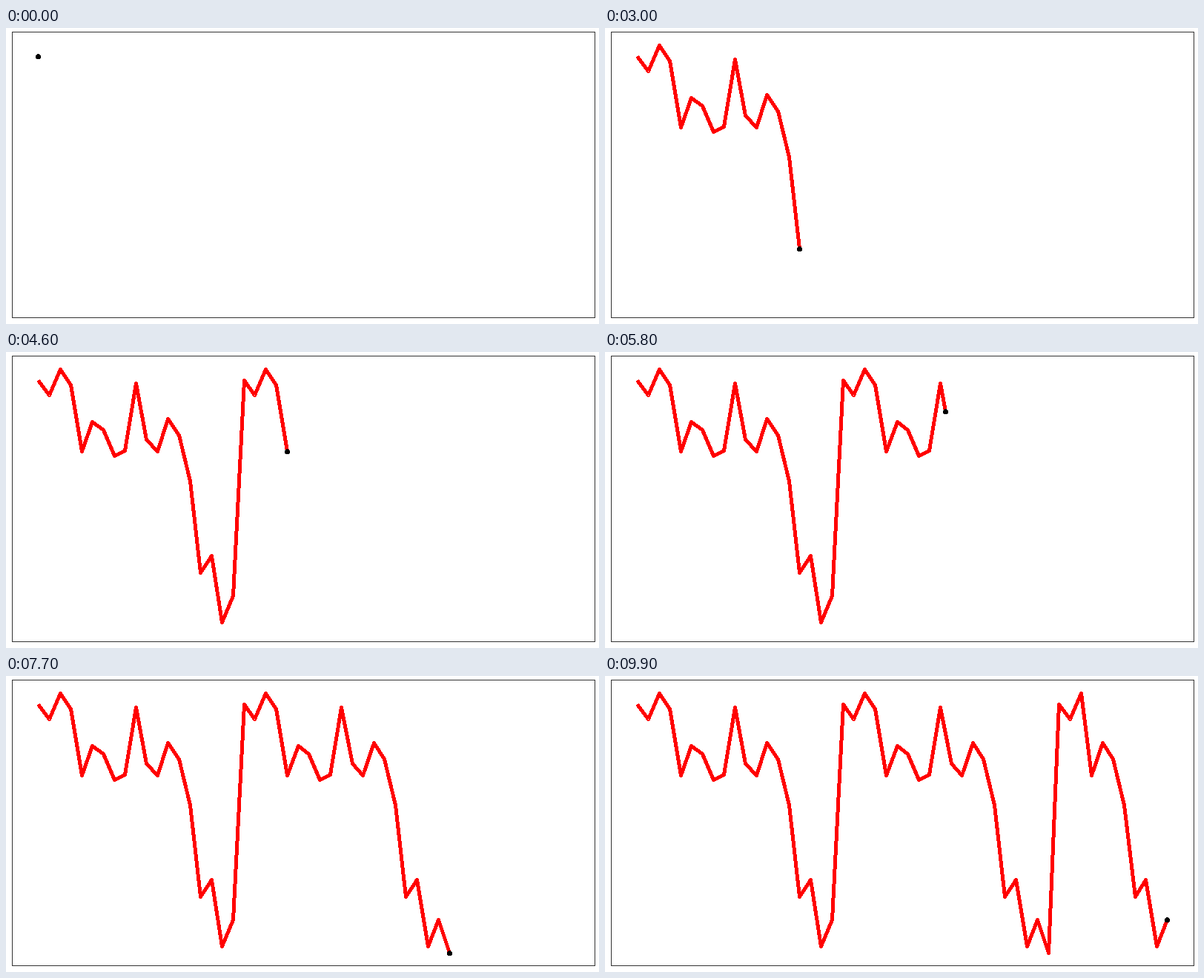
Animation, 800 px wide and 400 px high, one loop 10000 ms. Source, as an HTML page:

```html
<!DOCTYPE html>
<html lang="en">
<head>
<meta charset="utf-8">
<title>Line reveal</title>
<style>
  html, body { margin: 0; width: 100%; height: 100%; overflow: hidden; background: #fff; }
  svg { display: block; }
</style>
</head>
<body>
<svg width="800" height="400" shape-rendering="crispEdges">
  <rect x="8.5" y="5.5" width="786" height="386" fill="none" stroke="#333"/>
  <g transform="translate(.5 .5)">
    <polyline id="line" fill="none" stroke="#f00" stroke-width="5" stroke-linejoin="round"/>
    <circle id="dot" r="3.5"/>
  </g>
</svg>
<script>
const line = document.getElementById('line');
const dot = document.getElementById('dot');

// The series repeats: a full run, a run with a dip at the end, a shortened run.
const start = [38, 58, 23], middle = [44, 134, 94, 105, 140, 133, 42, 118];
const end = [134, 90, 112, 174, 298, 275, 365, 329];
const run = [...start, ...middle, ...end];
const ys = [...run, ...run, 374, ...start, ...end];

const STEPS = 100, STEP_MS = 100;
const last = ys.length - 1;
const stepOf = i => Math.round(i * (STEPS - 1) / last);
const xAt = i => Math.round(43.4 + 14.59 * i);

function draw(now) {
  const step = Math.floor(now / STEP_MS) % STEPS;
  let i = 0;
  while (i < last && stepOf(i + 1) <= step) i++;

  const points = ys.slice(0, i + 1).map((y, k) => [xAt(k), y]);
  if (i < last && step > stepOf(i)) {
    const part = (step - stepOf(i)) / (stepOf(i + 1) - stepOf(i));
    points.push([xAt(i + part), Math.round(ys[i] + part * (ys[i + 1] - ys[i]))]);
  }

  const [x, y] = points[points.length - 1];
  line.setAttribute('points', points.join(' '));
  dot.setAttribute('cx', x);
  dot.setAttribute('cy', y);
}

const t0 = performance.now();
function tick() {
  draw(performance.now() - t0);
  requestAnimationFrame(tick);
}
tick();
</script>
</body>
</html>
```
